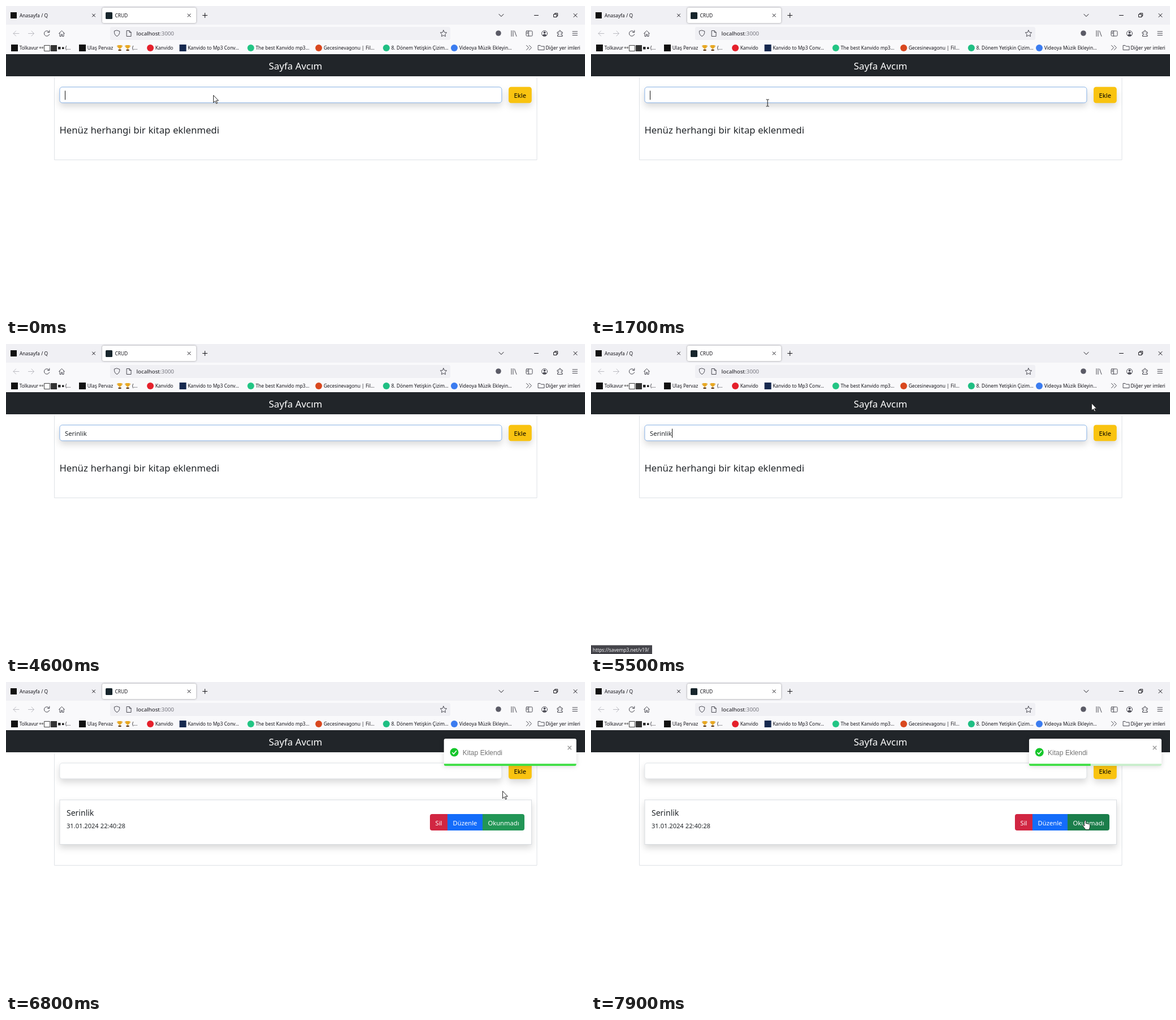
Write an HTML page that moves like this. It is 1023 by 547 pixels and loops after 8000 ms.

```html
<!DOCTYPE html>
<html lang="tr">
<head>
<meta charset="utf-8">
<title>CRUD</title>
<style>
  html, body { margin: 0; width: 100%; height: 100%; overflow: hidden; background: #fff; }
  svg { display: block; width: 100%; height: 100%; }
  text { font-family: "Noto Sans", "Open Sans", sans-serif; font-size: 11.2px; word-spacing: .02em; fill: #212529; white-space: pre; }
  .ui text { font-size: 8.4px; fill: #15141a; }
  .icon { fill: none; stroke: #4a4a53; stroke-width: 1; stroke-linecap: round; stroke-linejoin: round; }
  .shadow { filter: drop-shadow(0 6px 6px rgba(0, 0, 0, .15)); }
  .btn { fill: #fff; text-anchor: middle; }
</style>
</head>
<body>
<svg viewBox="0 0 1023 547">
  <defs>
    <clipPath id="round"><rect x="774" y="100" width="234" height="48" rx="3"/></clipPath>
    <g id="cup">
      <path d="M2 1H8V4Q8 7 5 7Q2 7 2 4ZM4.4 6.5H5.6V9H4.4Z" fill="#e9a820"/>
      <path d="M2 2H.6Q.6 5 2.6 5M8 2H9.4Q9.4 5 7.4 5" fill="none" stroke="#d99a1b"/>
      <path d="M2.5 8.7H7.5V11H2.5Z" fill="#5a3a1c"/>
    </g>
  </defs>

  <g class="ui">
    <rect width="1023" height="33" fill="#f0f0f4"/>
    <rect y="33" width="1023" height="52" fill="#f9f9fb"/>
    <rect x="170" y="3" width="166" height="27" rx="3" fill="#fff" style="filter:drop-shadow(0 0 1.5px rgba(0,0,0,.4))"/>
    <rect x="184" y="37" width="601" height="23" rx="3" fill="#f0f0f4"/>
    <rect x="8" y="11" width="11" height="11" fill="#111"/>
    <rect x="176" y="11" width="12" height="12" rx="1.5" fill="#17252c"/>
    <text x="24" y="20">Anasayfa / Q</text>
    <text x="192.500" y="20">CRUD</text>
    <text x="230.500" y="52.300" style="font-size:9.8px">localhost<tspan fill="#77777f">:3000</tspan></text>

    <g class="icon">
      <path stroke="#15141a" d="M152.500 14l5 5m0-5l-5 5M321 14l5 5m0-5l-5 5M347.500 16.500h8m-4-4v8M871 14.500l4 4 4-4M933.500 16.500h7M968 14.500h5v5h-5zM969.700 14.500v-1.700h5v5h-1.700M1003 13.500l6 6m0-6l-6 6"/>
      <path stroke="#bcbcc2" d="M23 48.500H13m4.500-4.500l-4.500 4.500 4.500 4.500M39.500 48.500h10m-4.500-4.500l4.500 4.500-4.500 4.500"/>
      <path d="M76.300 46.200a4.700 4.700 0 1 0 .4 3.600M76.800 43v3.500h-3.500"/>
      <path d="M93.500 48.500l5-5 5 5M95 47.500v6h2.500v-3.500h2v3.500h2.500v-6"/>
      <path d="M196 43l4.700 1.500q.5 6.500-4.700 9-5.200-2.500-4.700-9z"/>
      <path d="M213.500 43.500h4.500l3 3v7h-7.500zM218 43.500v3h3"/>
      <path d="M773 42.800l1.700 3.600 4 .5-2.900 2.800.7 4-3.500-1.900-3.500 1.900.7-4-2.900-2.800 4-.5z"/>
      <path d="M893 43.500v10M896 43.500v10M898.500 44l3.500 9.500"/>
      <path d="M920 44h8.500q1.500 0 1.500 1.500v6q0 1.500-1.500 1.500h-8q-1.500 0-1.500-1.500v-6q0-1.500 1.500-1.500M923.500 44v9M920.500 46.500h1.500M920.500 48.500h1.500"/>
      <circle cx="951.500" cy="48.500" r="5"/>
      <path d="M948.500 52q0-2 3-2t3 2z" fill="#4a4a53"/><circle cx="951.500" cy="46.800" r="1.500" fill="#4a4a53"/>
      <path d="M974.500 46h2.800q-.8-3 1.400-3t1.400 3h3v2.500q-2.600-.6-2.600 1.300t2.600 1.300v2.400h-8.600v-2.600q2.600.6 2.600-1.200t-2.600-1.200z"/>
      <path d="M1001 45h8.500M1001 48.300h8.500M1001 51.600h8.500"/>
      <path d="M919.500 69.500l4 4-4 4M924.500 69.500l4 4-4 4"/>
      <path d="M940.500 69.500h3.500l1.500 1.700h5.500v6.300h-10.500z"/>
    </g>
    <circle cx="870" cy="48" r="4.800" fill="#5b5b66"/>

    <g id="marks"></g>
    <path d="M59.500 72.500h2v2h-2zM63.500 72.500h2v2h-2z" fill="none" stroke="#444" stroke-width=".8"/>
    <path d="M67.500 69.500h10v10h-10z" fill="#fff" stroke="#444"/>
    <path d="M79 69h11v11h-11z" fill="#333"/>
    <path d="M92 72h4.500v4.500h-4.500zM99 72.500h3.500v3.500h-3.500z" fill="#222"/>
    <text x="105" y="77">(...</text>
    <use href="#cup" x="196" y="68"/><use href="#cup" x="210" y="68"/>
    <text x="223" y="77">(...</text>
    <text x="953.500" y="77">Diğer yer imleri</text>
  </g>

  <rect y="85" width="1023" height="39" fill="#212529"/>
  <text x="511.500" y="112" text-anchor="middle" style="font-size:16.8px;fill:#fff">Sayfa Avcım</text>

  <path id="frame" fill="none" stroke="#dee2e6"/>
  <rect id="field" class="shadow" x="94.900" y="143" width="781" height="27.800" rx="4.500" fill="#fff"/>
  <text id="value" x="104" y="162"></text>
  <path id="caret" stroke="#111"/>
  <rect id="add" class="shadow" x="888" y="142.700" width="40.800" height="28.500" rx="4.500"/>
  <text x="908.300" y="162" text-anchor="middle" style="fill:#000">Ekle</text>

  <text id="empty" x="94.500" y="225.300" style="font-size:16.7px">Henüz herhangi bir kitap eklenmedi</text>

  <g id="card">
    <rect class="shadow" x="95" y="208" width="833.500" height="78.500" fill="#fff" stroke="#d9dde1"/>
    <text id="book" x="107" y="236" style="font-size:14px"></text>
    <text x="107" y="258.300" style="font-size:11.1px">31.01.2024 22:40:28</text>
    <path d="M780 233h-27q-4 0-4 4v21q0 4 4 4h27z" fill="#d12642"/>
    <path d="M780 233h62v29h-62z" fill="#146cfa"/>
    <path id="unread" d="M842 233h70q4 0 4 4v21q0 4-4 4h-70z"/>
    <text class="btn" x="764.500" y="252.500">Sil</text>
    <text class="btn" x="811" y="252.500">Düzenle</text>
    <text class="btn" x="879" y="252.500">Okunmadı</text>
  </g>

  <g id="toast">
    <rect x="774" y="100" width="234" height="48" rx="3" fill="#fff" style="filter:drop-shadow(0 1px 4px rgba(0,0,0,.15))"/>
    <circle cx="792.300" cy="124" r="7.500" fill="#16c62b"/>
    <path d="M788.500 124.300l2.700 2.700 5-5.700" fill="none" stroke="#fff" stroke-width="1.600"/>
    <text x="807" y="128.500" style="font:12px 'Liberation Sans',Arial,sans-serif;fill:#757575">Kitap Eklendi</text>
    <path d="M992.800 112.800l6.400 6.400m0-6.400l-6.400 6.400" stroke="#9b9b9b" stroke-width="1.500"/>
    <g clip-path="url(#round)">
      <rect x="774" y="144.300" width="234" height="4" fill="#c8eecb"/>
      <rect id="bar" x="774" y="144.300" height="4" fill="#3fdf45"/>
    </g>
  </g>

  <g id="status">
    <rect y="531.500" width="108" height="15.500" fill="#45454b"/>
    <text x="3" y="543" style="font-size:8.4px;fill:#f4f4f6">https://savemp3.net/v19/</text>
  </g>

  <g id="pointer">
    <path id="arrow" transform="scale(1.08)" d="M.5.500v12l2.700-2.600 2 4.100 1.800-.8-2-4h3.700z" fill="#fff" stroke="#222" stroke-width=".9"/>
    <path id="beam" d="M-2.500-6h2l.5.500.500-.5h2M0-5.500v11M-2.500 6h2l.5-.5.500.500h2" fill="none" stroke="#111"/>
    <path id="hand" d="M0 0q1.500-1.500 2.500 0v4.500l5 1q2 .5 2 2.500v3l-1.500 4.500h-6l-4.500-6q-1.200-1.600.3-2l2.200 1.500z" fill="#fff" stroke="#222" stroke-width=".9" stroke-linejoin="round"/>
  </g>
</svg>
<script>
const LOOP = 8000, TYPE = 2900, KEY = 164, MOVE = 4700, ADD = 6130, ENTER = 700, CLOSE = 2000;
const BOOK = 'Serinlik';
const TYPED = TYPE + KEY * (BOOK.length - 1);
const el = {};
document.querySelectorAll('[id]').forEach(n => el[n.id] = n);

const set = (node, attrs) => { for (const k in attrs) node.setAttribute(k, attrs[k]); };
const show = (node, on) => set(node, { visibility: on ? 'inherit' : 'hidden' });
const clamp = v => Math.max(0, Math.min(1, v));

// x, colour, corner radius, label
const marks = [
  [9, '#111', 0, 'Tolkavur'], [129, '#111', 0, 'Ulaş Pervaz'],
  [249, '#e5202b', 6, 'Kanvido'], [306.500, '#16294f', 0, 'Kanvido to Mp3 Conv...'],
  [426.500, '#22c584', 6, 'The best Kanvido mp3...'], [546.500, '#d9481f', 6, 'Gecesinevagonu | Fil...'],
  [666, '#1fbf83', 6, '8. Dönem Yetişkin Çizim...'], [786, '#3b7cf0', 6, 'Videoya Müzik Ekleyin...']
];
el.marks.innerHTML = marks.map(([x, fill, r, label]) =>
  `<rect x="${x}" y="68" width="12" height="12" rx="${r}" fill="${fill}"/><text x="${x + 14.7}" y="77">${label}</text>`).join('');
el.book.textContent = BOOK;

// time, x, y
const route = [
  [0, 366, 157], [300, 366, 157], [1300, 312, 171], [MOVE, 312, 171], [5100, 482, 74],
  [5500, 884, 104], [5900, 906, 158], [6300, 906, 158], [6800, 877, 192],
  [7200, 872, 244], [7500, 870, 250], [7900, 872, 245], [LOOP, 872, 245]
];

function pointerAt(t) {
  const i = route.findIndex(k => k[0] > t);
  const [a, b] = [route[i - 1], route[i]];
  const p = (t - a[0]) / (b[0] - a[0]), e = p * p * (3 - 2 * p);
  return [a[1] + (b[1] - a[1]) * e, a[2] + (b[2] - a[2]) * e];
}

// Slides in from the right with a decaying bounce
const bounce = [[0, 2250], [.6, -18.75], [.75, 7.5], [.9, -3.75], [1, 0]];
function toastShift(p) {
  if (p >= 1) return 0;
  const i = bounce.findIndex(k => k[0] > p);
  const [a, b] = [bounce[i - 1], bounce[i]];
  const e = 1 - (1 - (p - a[0]) / (b[0] - a[0])) ** 3;
  return a[1] + (b[1] - a[1]) * e;
}

function caretOn(t) {
  if (t >= ADD) return false;
  if (t < TYPE) return (t + 400) % 1000 < 500;
  return t < TYPED || (t - TYPED) % 1000 < 500;
}

function draw(t) {
  const added = t >= ADD;
  const count = added || t < TYPE ? 0 : Math.min(BOOK.length, 1 + Math.floor((t - TYPE) / KEY));
  const [x, y] = pointerAt(t);
  const within = (l, top, r, b) => x >= l && x <= r && y >= top && y <= b;

  el.value.textContent = BOOK.slice(0, count);
  const cx = 104.500 + (count ? Math.round(el.value.getComputedTextLength()) : 0);
  set(el.caret, { d: `M${cx} 149.500V165.500` });
  show(el.caret, caretOn(t));
  set(el.field, { stroke: added ? '#dee2e6' : '#86b1e6' });
  set(el.frame, { d: `M85.500 125V${added ? 323 : 271}.500H938V125` });
  show(el.empty, !added);
  show(el.card, added);

  const onAdd = within(888, 143, 929, 171), onUnread = added && within(842, 233, 916, 262);
  set(el.add, { fill: onAdd ? '#ffca2c' : '#f9c310' });
  set(el.unread, { fill: onUnread ? '#1b7e4b' : '#229656' });

  show(el.toast, added);
  if (added) {
    set(el.toast, { transform: `translate(${toastShift((t - ADD) / ENTER)} 0)` });
    set(el.bar, { width: 234 * (1 - clamp((t - ADD - ENTER) / CLOSE)) });
  }
  show(el.status, t >= 4990 && t < 5600);

  // The pointer hides while keys are pressed
  const shape = onAdd || onUnread ? 'hand' : t >= 300 && within(95, 143, 876, 172) ? 'beam' : 'arrow';
  for (const k of ['arrow', 'beam', 'hand']) show(el[k], k === shape);
  show(el.pointer, t < TYPE || t >= MOVE);
  set(el.pointer, { transform: `translate(${x} ${y})` });
}

const start = performance.now();
function tick() {
  draw((performance.now() - start) % LOOP);
  requestAnimationFrame(tick);
}
tick();
</script>
</body>
</html>
```
